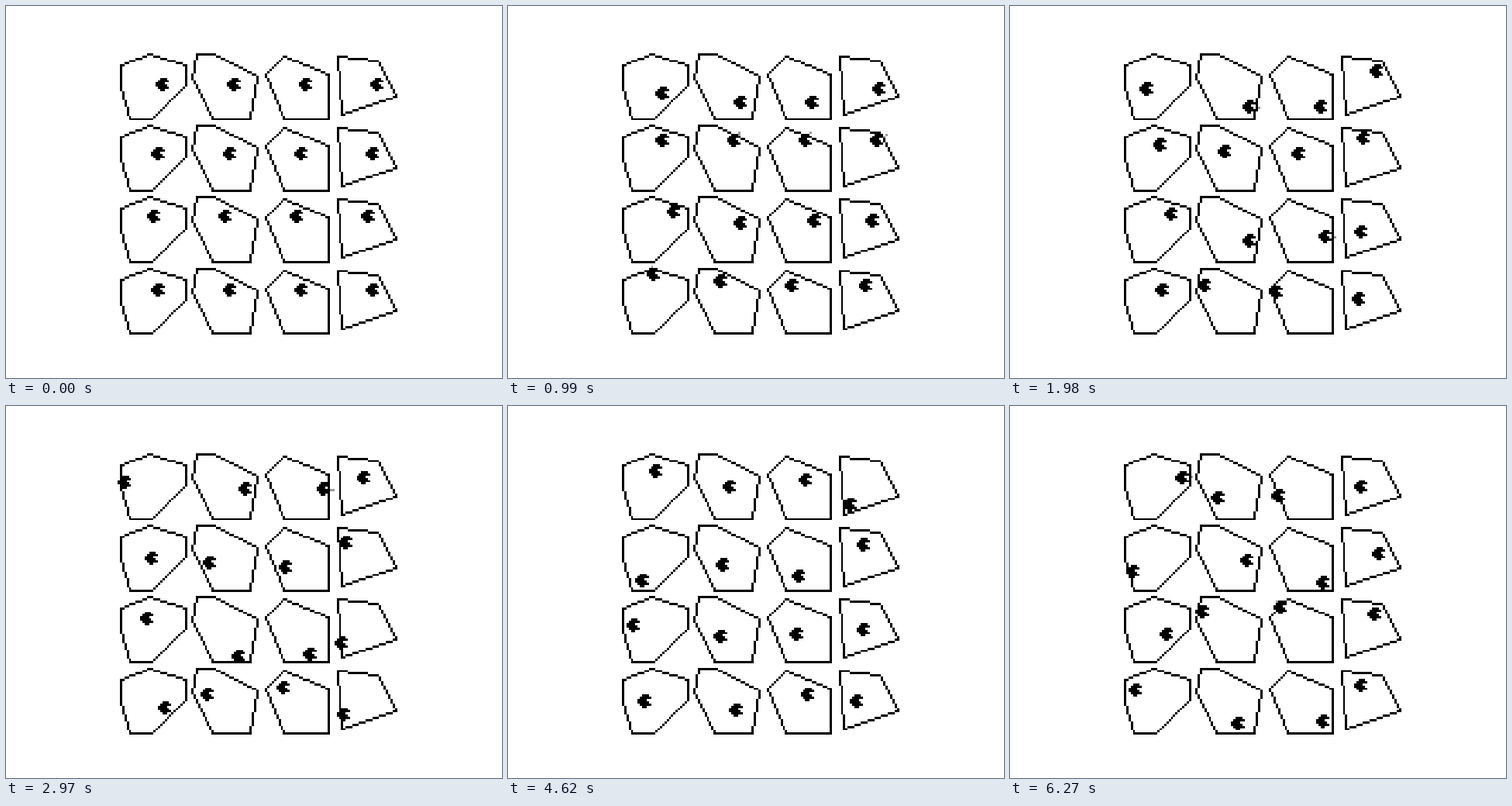
Animation of 640 by 480 pixels, one loop 6.6 s. Source, as an HTML page:

```html
<!DOCTYPE html>
<html lang="en">
<head>
<meta charset="utf-8">
<title>Bouncing dots</title>
<style>
  html, body { margin: 0; width: 100%; height: 100%; overflow: hidden; background: #fff; }
  svg { display: block; width: 640px; height: 480px; }
</style>
</head>
<body>
<svg viewBox="0 0 640 480" shape-rendering="crispEdges">
  <g transform="translate(0 .37) scale(2.88288)">
    <path id="marks" fill="#999"/>
    <path id="walls"/>
    <path id="dots"/>
  </g>
</svg>
<script>
const PITCH = 32, STEP = 330, STEPS = 20;
const REACH = 2.5;   // distance at which a dot touches a wall
const SHIFT = 1;     // the touching point sits right of the dot's centre

// One room per column, clockwise on the pixel grid.
const rooms = [
  [[64, 21], [80, 26], [80, 35], [65, 50], [55, 50], [51, 36], [51, 26]],
  [[85, 21], [93, 21], [112, 31], [109, 50], [92, 50], [83, 32]],
  [[124, 22], [144, 30], [144, 50], [124, 50], [116, 30]],
  [[148, 22], [166, 24], [174, 40], [150, 48]]
];

// One launch per row, relative to the first room, in cells per step.
const launches = [
  { x: 69.6, y: 35.1, vx: 0.92, vy: 2.65 },
  { x: 68, y: 34, vx: 0.35, vy: -2.15 },
  { x: 66.2, y: 30, vx: 2.75, vy: -0.7 },
  { x: 68, y: 31, vx: -1.05, vy: -2.5 }
];

const sprite = ['..###.', '.#####', '####..', '#####.', '.#####', '..##..'];

const run = (x, y, w = 1) => `M${x} ${y}h${w}v1h${-w}z`;
const setPath = (id, d) => document.getElementById(id).setAttribute('d', d);
const edges = pts => pts.map((p, i) => [p, pts[(i + 1) % pts.length]]);

function pixelLine([x0, y0], [x1, y1]) {
  const n = Math.max(Math.abs(x1 - x0), Math.abs(y1 - y0));
  let d = '';
  for (let i = 0; i <= n; i++) {
    d += run(Math.round(x0 + (x1 - x0) * i / n), Math.round(y0 + (y1 - y0) * i / n));
  }
  return d;
}

function wallPath() {
  let d = '';
  for (let row = 0; row < 4; row++) {
    for (const room of rooms) {
      const pts = room.map(([x, y]) => [x, y + row * PITCH]);
      for (const [a, b] of edges(pts)) d += pixelLine(a, b);
    }
  }
  return d;
}

// Walls with outward normals, through the middle of the drawn pixels.
const wallsOf = room => edges(room).map(([a, b]) => {
  const dx = b[0] - a[0], dy = b[1] - a[1], len = Math.hypot(dx, dy);
  return { x: a[0] + 0.5, y: a[1] + 0.5, nx: dy / len, ny: -dx / len };
});

// Mirror the velocity in the wall met most squarely; a sharp corner sends the dot back.
function bounce(dot, walls) {
  const hits = walls.map(w => ({
    ...w,
    depth: REACH - (w.x - dot.x - SHIFT) * w.nx - (w.y - dot.y) * w.ny,
    push: dot.vx * w.nx + dot.vy * w.ny
  })).filter(h => h.depth > 0 && h.push > 0).sort((a, b) => b.push - a.push);
  if (!hits.length) return null;

  const { nx, ny, depth, push } = hits[0];
  const corner = hits.some(h => h.nx * nx + h.ny * ny < 0.9);
  dot.x -= nx * depth;
  dot.y -= ny * depth;
  dot.vx = corner ? -dot.vx : dot.vx - 2 * push * nx;
  dot.vy = corner ? -dot.vy : dot.vy - 2 * push * ny;
  return { nx, ny };
}

function dotPath(x, y) {
  const left = Math.round(x) - 3, top = Math.round(y) - 3;
  return sprite.map((line, i) => {
    const start = line.indexOf('#');
    return run(left + start, top + i, line.lastIndexOf('#') - start + 1);
  }).join('');
}

const markPath = (x, y, { nx, ny }) => [2.5, 3.5].map(r =>
  run(Math.floor(x + SHIFT + nx * r), Math.floor(y + ny * r))).join('');

function simulate() {
  const frames = Array.from({ length: STEPS }, () => ({ dots: '', marks: '' }));
  launches.forEach((launch, row) => rooms.forEach((room, col) => {
    const walls = wallsOf(room);
    const dot = { ...launch, x: launch.x + col * PITCH };
    for (const frame of frames) {
      const x = dot.x, y = dot.y + row * PITCH;
      const hit = bounce(dot, walls);
      frame.dots += dotPath(x, y);
      if (hit) frame.marks += markPath(x, y, hit);
      dot.x += dot.vx;
      dot.y += dot.vy;
    }
  }));
  return frames;
}

const frames = simulate();
const begin = performance.now();
let shown = -1;

function tick() {
  const step = Math.floor((performance.now() - begin) / STEP) % STEPS;
  if (step !== shown) {
    shown = step;
    setPath('dots', frames[step].dots);
    setPath('marks', frames[step].marks);
  }
  requestAnimationFrame(tick);
}

setPath('walls', wallPath());
tick();
</script>
</body>
</html>
```
